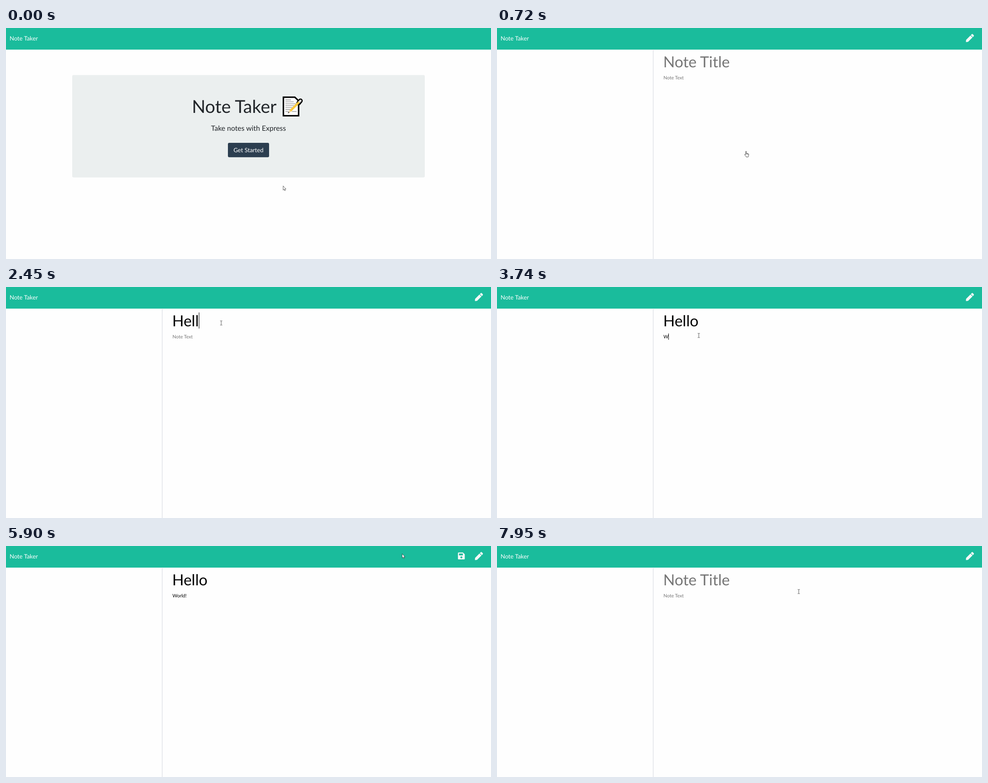
Recreate the animation shown at these times as an HTML page. Size 1084 by 517 pixels, loop 8 s.

```html
<!DOCTYPE html>
<html lang="en">
<head>
<meta charset="utf-8">
<title>Note Taker</title>
<style>
  html, body { margin: 0; width: 100%; height: 100%; overflow: hidden; background: #fefefe; }
  svg { display: block; width: 1084px; height: 517px; font-family: Lato, sans-serif; text-rendering: geometricPrecision; }
</style>
</head>
<body>
<svg viewBox="0 0 1084 517">
  <rect width="1084" height="517" fill="#fefefe"/>
  <rect width="1084" height="48.4" fill="#1abc9c"/>
  <text x="8" y="27.6" font-size="13.3" fill="#fff">Note Taker</text>

  <g id="home">
    <rect x="148" y="105.2" width="788" height="229.4" rx="3" fill="#ebefef"/>
    <text x="415.4" y="189.6" font-size="39.76" fill="#212529">Note Taker</text>
    <g id="memo">
      <path d="M620 154.8H645.5L654 163V196.4H620Z" fill="#fff" stroke="#000" stroke-width="3.2"/>
      <path d="M624.5 161H637M624.5 165.3H643M624.5 169.6H648M624.5 173.9H645M624.5 178.2H641M624.5 182.5H637M624.5 186.8H632M639 186.8H649.5"
            stroke="#8d8d8d" stroke-width="1.3"/>
      <path d="M654 168L658.2 162.8" stroke="#000" stroke-width="10" stroke-linecap="round"/>
      <path d="M654.5 166.5L658.2 162.8" stroke="#d9d9d9" stroke-width="4.8" stroke-linecap="round"/>
      <path d="M635.5 185.5L655 166" stroke="#fbc93d" stroke-width="4.8"/>
      <path d="M633.7 183.7L637.3 187.3L630 191Z" fill="#f3d9a4"/>
      <path d="M631.6 187.6L633.4 189.3L629.6 191.2Z" fill="#333"/>
    </g>
    <text x="542" y="230.3" font-size="15.97" fill="#212529" text-anchor="middle">Take notes with Express</text>
    <rect id="ring" x="494" y="255" width="96" height="36" rx="4.5" fill="#8c98a1"/>
    <rect id="button" x="496" y="257" width="92" height="32.3" rx="3"/>
    <text x="542" y="277.6" font-size="13.3" fill="#fff" text-anchor="middle">Get Started</text>
  </g>

  <g id="notes">
    <rect x="348.5" y="48.4" width="1.4" height="469" fill="#dee2e6"/>
    <text id="title" x="371.4" y="88.2" font-size="34.08"></text>
    <text id="body" x="372" y="115.1" font-size="10.65"></text>
    <rect id="caret" width="1" fill="#000"/>
    <path id="save" fill="#f5f8f7" fill-rule="evenodd"
          d="M1011.7 14.5H1021.3L1025.4 18.6V28.5Q1025.4 30.1 1023.8 30.1H1011.7Q1010.1 30.1 1010.1 28.5V16.1Q1010.1 14.5 1011.7 14.5ZM1012.5 16.8V20.9H1021.1V16.8ZM1017.8 23.2a2.25 2.25 0 1 0 .01 0Z"/>
    <path id="pen" fill="#f5f8f7" transform="translate(1048 13.4)"
          d="M10.2 3.3L14.7 7.8L4.9 17.5L.9 18Q-.1 18 0 17L.5 13ZM11 2.5L13 .5Q14.2 -.6 15.4 .5L17.5 2.6Q18.6 3.8 17.5 5L15.5 7Z"/>
  </g>

  <g id="mouse">
    <path id="arrow" d="M.4 .4V9.8L2.5 7.9L4 11.2L5.4 10.6L4 7.4H6.8Z" fill="#fff" stroke="#222" stroke-width=".7"/>
    <g id="hand" transform="translate(-3.6 0)" stroke="#222" stroke-width=".8" stroke-linejoin="round">
      <path d="M2.6 1.4a1 1 0 0 1 2 0V5L8.6 6Q9.8 6.3 9.7 7.6L9.2 10.6L8.3 13.2H4L3.4 11.6L.7 8.6Q.2 7 1.6 7L2.6 7.9Z" fill="#fff"/>
      <path d="M4.6 5V7.2M6.3 5.5V7.4M8 6V7.7" fill="none"/>
    </g>
    <path id="beam" d="M-2.4 -4.7H-.6L0 -4.2L.6 -4.7H2.4M0 -4.2V4.2M-2.4 4.7H-.6L0 4.2L.6 4.7H2.4" fill="none" stroke="#444" stroke-width=".9"/>
  </g>
</svg>
<script>
const LOOP = 8000, OPEN = 720, CLEAR = 7870;
const $ = id => document.getElementById(id);
const show = (id, on) => { $(id).style.display = on ? '' : 'none'; };
const within = (t, spans) => spans.some(([a, b]) => t >= a && t < b);

// Pointer moves: first step, last step, step count, end x, end y
const moves = [
  [90, 480, 6, 556.6, 275.5],
  [870, 1250, 6, 481, 80.5],
  [2950, 3400, 7, 451, 108.5],
  [5350, 5580, 4, 904, -35],
  [5900, 5900, 1, 885, 17],
  [5980, 6460, 7, 995, 20],
  [6960, 7160, 4, 1010, 24],
  [7340, 7420, 2, 1001, 22],
  [7490, 7720, 4, 1018, 18],
  [7870, 7950, 2, 674.5, 102]
];

const fields = {
  title: { text: 'Hello', hint: 'Note Title', keys: [1900, 2130, 2300, 2450, 2620],
           caret: [[1250, 1660], [1900, 3100]], top: 57, height: 36 },
  body: { text: 'World!', hint: 'Note Text', keys: [3740, 4160, 4240, 4410, 4580, 4970],
          caret: [[3400, 5500], [5980, 6460]], top: 104, height: 14 }
};

function pointer(t) {
  let x = 619, y = 353;
  for (const [start, end, count, toX, toY] of moves) {
    if (t < start) break;
    const gap = (end - start) / Math.max(1, count - 1);
    const step = gap ? Math.min(count, Math.floor((t - start) / gap + 0.02) + 1) : count;
    let p = step / count;
    if (count > 4) p = p * p * (3 - 2 * p);
    x += (toX - x) * p;
    y += (toY - y) * p;
  }
  return { x, y };
}

function drawField(id, t) {
  const f = fields[id], node = $(id);
  const n = t < CLEAR ? f.keys.filter(k => t >= k).length : 0;
  node.textContent = n ? f.text.slice(0, n) : f.hint;
  node.setAttribute('fill', n ? '#000' : '#757575');
  if (!within(t, f.caret)) return false;
  const x = +node.getAttribute('x') + (n ? node.getComputedTextLength() : 0);
  const caret = $('caret');
  caret.setAttribute('x', Math.round(x));
  caret.setAttribute('y', f.top);
  caret.setAttribute('height', f.height);
  return true;
}

function draw(t) {
  const { x, y } = pointer(t);
  const hover = x > 496 && x < 588 && y > 257 && y < 289;
  const home = t < OPEN;

  show('home', home);
  show('notes', !home);
  if (home) {
    $('button').setAttribute('fill', hover ? '#1e2b37' : '#2c3e50');
    show('ring', t >= 560);
  } else {
    const inTitle = drawField('title', t), inBody = drawField('body', t);
    show('caret', inTitle || inBody);
    show('save', t >= 3830 && t < CLEAR);
  }

  let kind = 'beam';
  if (t < 870) kind = hover ? 'hand' : 'arrow';
  else if (y < 48) kind = x > 1008 && x < 1027 ? 'hand' : 'arrow';
  for (const id of ['arrow', 'hand', 'beam']) show(id, id === kind);
  $('mouse').setAttribute('transform', `translate(${x.toFixed(2)} ${y.toFixed(2)})`);
}

const begin = performance.now();
function tick() {
  draw((performance.now() - begin) % LOOP);
  requestAnimationFrame(tick);
}
tick();
</script>
</body>
</html>
```
